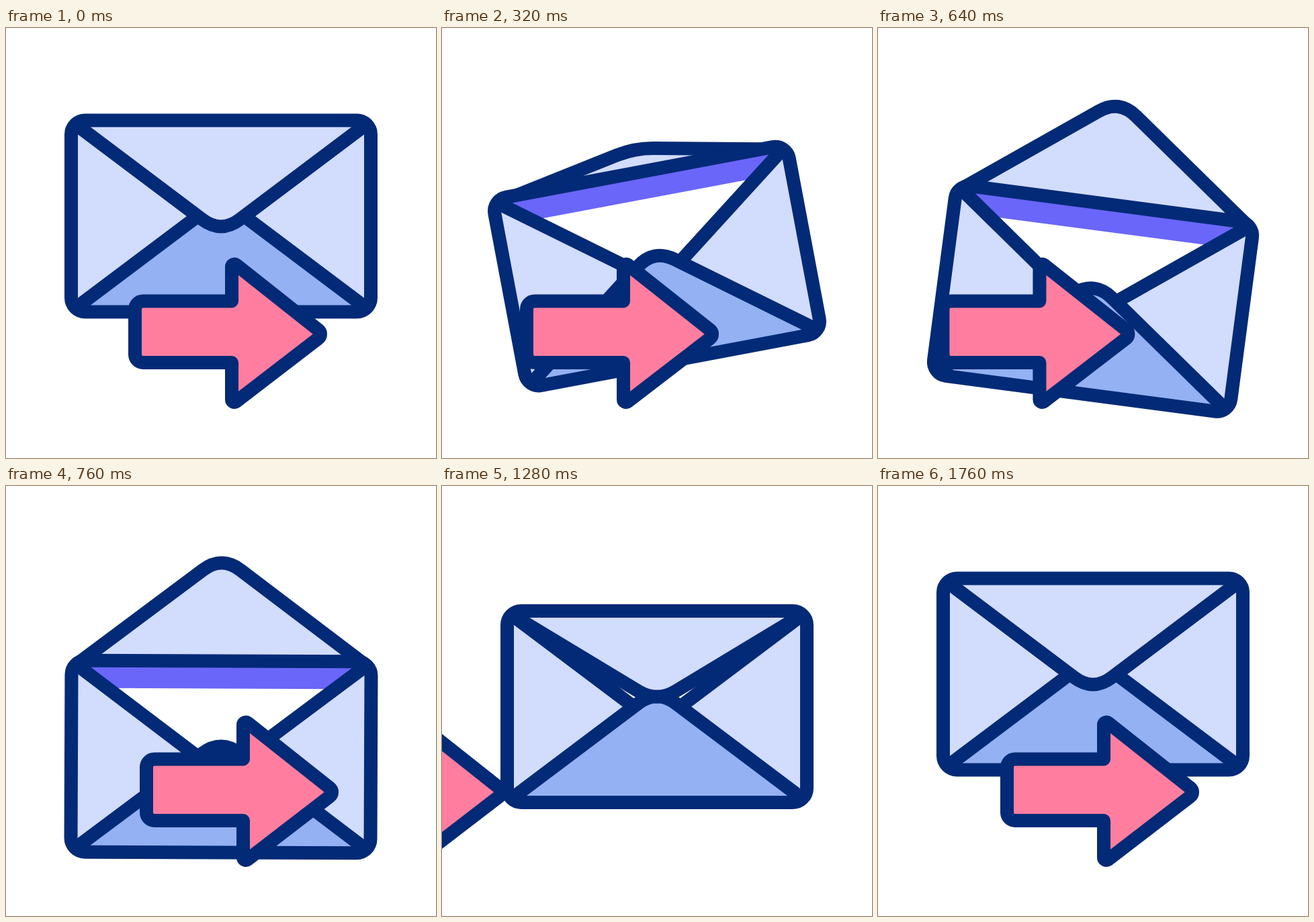
Write an HTML page with a canvas that moves like this. It is 640x640 px and loops after 2000 ms.

```html
<!DOCTYPE html>
<html lang="en">
<head>
<meta charset="utf-8">
<title>Envelope and arrow</title>
<style>
html, body { margin: 0; width: 100%; height: 100%; overflow: hidden; background: #fff; }
canvas { display: block; }
</style>
</head>
<body>
<canvas id="stage" width="640" height="640"></canvas>
<script>
const ctx = document.getElementById('stage').getContext('2d');
const LOOP = 2000, STEP = 40;
const NAVY = '#032a76', PALE = '#d2dcfd', BLUE = '#93b1f3', PURPLE = '#6a66f9', PINK = '#ff7ea0';
const LEFT = 97, TOP = 137.5, WIDTH = 446, HEIGHT = 285, CORNER = 21;
const INSET = 7, FOLD = 162.5;
const MID_X = LEFT + WIDTH / 2, MID_Y = TOP + HEIGHT / 2;
const FOLD_TOP = TOP + 6, FOLD_BOTTOM = TOP + HEIGHT - 6;

// Smooth rise from 0 to 1 between two times
function ramp(t, from, to) {
  const u = Math.min(1, Math.max(0, (t - from) / (to - from)));
  return u * u * (3 - 2 * u);
}

const drop = t => 123 * (ramp(t, 160, 440) - ramp(t, 1120, 1400));

// 1 is shut, -1 is fully open, with a small overshoot
const lidFold = t => 1 - 2.04 * ramp(t, 43, 521) + 0.04 * ramp(t, 520, 600) + 2 * ramp(t, 950, 1360);

// Swings back and forth until it rests
const tilt = t => -13.3 * ramp(t, 120, 400) + 21.6 * ramp(t, 400, 600)
  - 10.9 * ramp(t, 600, 840) + 2.6 * ramp(t, 840, 1090);

// Pulls back, shoots off to the right, then returns from the left
function arrowX(t) {
  if (t < 560) return -117 * ramp(t, 35, 560);
  if (t < 1120) return -117 + 134 * ((t - 560) / 200) ** 2;
  return -530 + 580 * ramp(t, 1120, 1600) - 50 * ramp(t, 1600, 1760);
}

function paint(path, fill) {
  if (fill) {
    ctx.fillStyle = fill;
    ctx.fill(path);
  }
  ctx.stroke(path);
}

// Triangle on a base line with a rounded tip, height is signed
function flap(base, height) {
  const p = new Path2D(), shoulder = base + height * 0.87;
  p.moveTo(LEFT + INSET, base);
  p.lineTo(MID_X - 28, shoulder);
  p.quadraticCurveTo(MID_X, base + height, MID_X + 28, shoulder);
  p.lineTo(LEFT + WIDTH - INSET, base);
  return p;
}

function arrowShape() {
  const tail = 192, neck = 336, tip = 473, p = new Path2D();
  p.moveTo(tail, 452);
  p.arcTo(tail, 406.5, neck, 406.5, 12);
  p.lineTo(neck, 406.5);
  p.arcTo(neck, 347.3, tip, 455.8, 4);
  p.arcTo(tip, 455.8, neck, 561, 8);
  p.arcTo(neck, 561, neck, 498, 4);
  p.lineTo(neck, 498);
  p.arcTo(tail, 498, tail, 452, 12);
  p.closePath();
  return p;
}

const frame = new Path2D();
frame.roundRect(LEFT, TOP, WIDTH, HEIGHT, CORNER);

const folds = new Path2D();
folds.moveTo(LEFT + INSET, FOLD_TOP);
folds.lineTo(MID_X, FOLD_TOP + FOLD);
folds.lineTo(LEFT + WIDTH - INSET, FOLD_TOP);

const sides = new Path2D(folds);
sides.lineTo(LEFT + WIDTH, TOP + HEIGHT);
sides.lineTo(LEFT, TOP + HEIGHT);

const pocket = flap(FOLD_BOTTOM, -FOLD);
const arrow = arrowShape();

function drawEnvelope(t) {
  const fold = lidFold(t), lid = flap(FOLD_TOP, FOLD * fold);
  ctx.save();
  ctx.translate(MID_X, MID_Y + drop(t));
  ctx.rotate(tilt(t) * Math.PI / 180);
  ctx.translate(-MID_X, -MID_Y);
  if (fold < 0) paint(lid, PALE);

  ctx.save();
  ctx.clip(frame);
  ctx.fillStyle = '#fff';
  ctx.fillRect(LEFT, TOP, WIDTH, HEIGHT);
  ctx.fillStyle = PURPLE;
  ctx.fillRect(LEFT, TOP, WIDTH, 41);
  ctx.fillStyle = PALE;
  ctx.fill(sides);
  ctx.restore();

  paint(folds);
  paint(pocket, BLUE);
  if (fold >= 0) paint(lid, PALE);
  paint(frame);
  ctx.restore();
}

function drawArrow(t) {
  ctx.save();
  ctx.translate(arrowX(t), 0);
  paint(arrow, PINK);
  ctx.restore();
}

const start = performance.now();
function tick() {
  const t = Math.floor((performance.now() - start) % LOOP / STEP) * STEP;
  ctx.clearRect(0, 0, 640, 640);
  ctx.strokeStyle = NAVY;
  ctx.lineWidth = 20;
  ctx.lineJoin = ctx.lineCap = 'round';
  drawEnvelope(t);
  drawArrow(t);
  requestAnimationFrame(tick);
}
tick();
</script>
</body>
</html>
```
